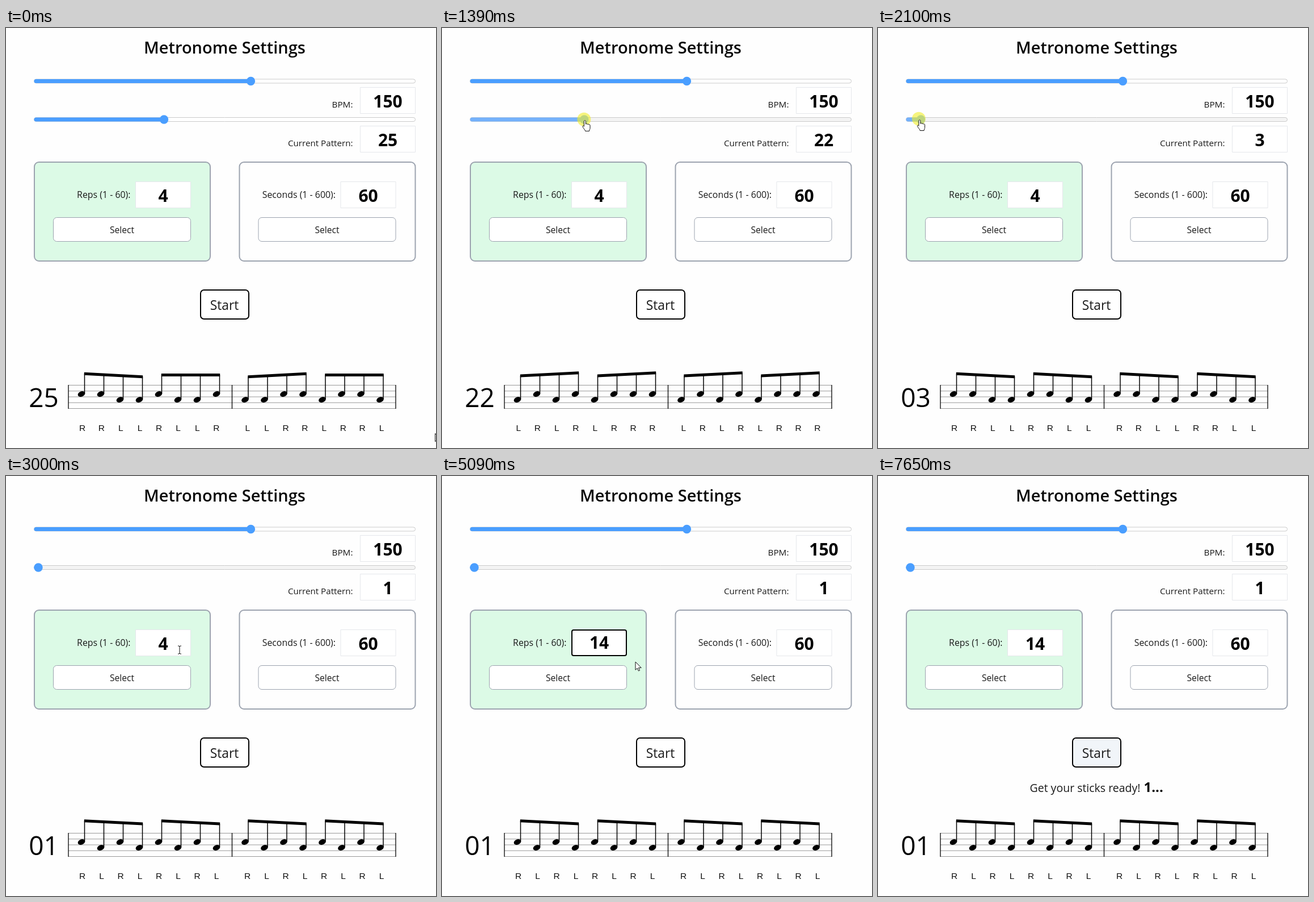
These frames come from a looping animation (758 by 739 pixels, 8000 ms). An HTML page with a canvas:

```html
<!DOCTYPE html>
<html lang="en">
<head>
<meta charset="utf-8">
<title>Metronome Settings</title>
<style>
  html, body { margin: 0; width: 100%; height: 100%; overflow: hidden; background: #fefefe; }
  canvas { display: block; }
</style>
</head>
<body>
<canvas id="stage" width="758" height="739"></canvas>
<script>
const ctx = document.getElementById('stage').getContext('2d');
const LOOP = 8000;
const UI = '"Open Sans", "Noto Sans", sans-serif';
const SANS = '"Liberation Sans", Arial, sans-serif';
const BLUE = '#4a9eff', GRAY = '#9ca3af', INK = '#1a1a1a';

// Sticking exercises; those in MIRRORED swap hands in the second bar.
const STICKING = ('RLRLRLRL LRLRLRLR RRLLRRLL LLRRLLRR RLRRLRLL RLLRLRRL RRLRLLRL ' +
  'RLRLLRLR RRRLRRRL LLLRLLLR RLLLRLLL LRRRLRRR RRRRLLLL RLRLRRLL LRLRLLRR RLRLRLRR ' +
  'RLRLRLLR RLRLRRLR RLRLRRRL LRLRLLLR RLRLRLLL LRLRLRRR RLRLRRRR RRLLRLRR RRLLRLLR').split(' ');
const MIRRORED = [16, 17, 18, 23, 24, 25];

// Pointer path: time, x, y
const PATH = [
  [350, 736, 342], [700, 500, 262], [1040, 276, 161], [1180, 276, 161],
  [1700, 173, 160], [1980, 96, 160], [2250, 45, 160], [2420, 8, 163],
  [2560, 40, 205], [2810, 262, 326], [2980, 306, 306], [3400, 306, 306],
  [3850, 286, 302], [4400, 286, 302], [4860, 341, 327], [5090, 341, 327],
  [5870, 398, 474], [5930, 398, 474], [6030, 545, 503], [6120, 733, 538]
];
const PRESS = [1000, 2420];
const TYPED = 4250, CLICK = 5870, READY = 5900;

const clamp = (v, a = 0, b = 1) => Math.min(b, Math.max(a, v));

function slope(i, k) {
  const p = PATH[i], a = PATH[i - 1], b = PATH[i + 1];
  if (!a || !b || (a[1] === p[1] && a[2] === p[2]) || (b[1] === p[1] && b[2] === p[2])) return 0;
  return (b[k] - a[k]) / (b[0] - a[0]);
}

function pointer(t) {
  if (t <= PATH[0][0]) return { x: PATH[0][1], y: PATH[0][2] };
  const i = PATH.findIndex(p => p[0] > t) - 1;
  if (i < 0) return { x: PATH.at(-1)[1], y: PATH.at(-1)[2] };
  const a = PATH[i], b = PATH[i + 1], d = b[0] - a[0], u = (t - a[0]) / d;
  const at = k => {
    const s = u * u * (3 - 2 * u);
    return a[k] + (b[k] - a[k]) * s +
      d * (u * (1 - u) * (1 - u) * slope(i, k) - u * u * (1 - u) * slope(i + 1, k));
  };
  return { x: at(1), y: at(2) };
}

function box(x, y, w, h, r, fill, stroke, line = 1) {
  const o = line / 2;
  ctx.beginPath();
  ctx.roundRect(x + o, y + o, w - line, h - line, r);
  ctx.fillStyle = fill;
  ctx.fill();
  if (!stroke) return;
  ctx.lineWidth = line;
  ctx.strokeStyle = stroke;
  ctx.stroke();
}

function text(s, x, y, size, align = 'left', weight = 400, color = INK, family = UI) {
  ctx.font = `${weight} ${size}px ${family}`;
  ctx.textAlign = align;
  ctx.fillStyle = color;
  ctx.fillText(s, x, y);
}

function segment(x1, y1, x2, y2, width, color) {
  ctx.beginPath();
  ctx.moveTo(x1, y1);
  ctx.lineTo(x2, y2);
  ctx.lineWidth = width;
  ctx.strokeStyle = color;
  ctx.stroke();
}

function disc(x, y, r, color) {
  ctx.beginPath();
  ctx.arc(x, y, r, 0, Math.PI * 2);
  ctx.fillStyle = color;
  ctx.fill();
}

function slider(y, x, fill, track) {
  box(49, y - 4, 673, 8, 4, track, '#cbcbcb');
  box(49, y - 4, x - 49, 8, 4, fill);
  disc(x, y, 7.7, fill);
}

function field(x, y, value, focus) {
  if (focus) box(x, y, 98, 47, 3, '#fff', '#000', 2);
  else box(x, y, 98, 47, 0, '#fff', '#e5e7eb');
  text(value, x + 49, y + (focus ? 34 : 36), 30, 'center', 700, '#000');
}

function panel(x, label, value, fill, focus) {
  box(x, 235, 312, 176, 8, fill, GRAY, 2);
  text(label, x + 170.5, 299, 15.9, 'right');
  field(x + 179, 270, value, focus);
  box(x + 34, 333, 243, 43, 6, '#fff', GRAY);
  text('Select', x + 155.5, 361, 15.7, 'center');
}

function beamed(hands, x) {
  const ys = hands.map(h => h === 'R' ? 644 : 654);
  const step = 34, first = x + 5.5, last = first + step * 3;
  const tilt = Math.sign(ys[3] - ys[0]) * 2.7;
  const same = ys.every(y => y === ys[0]);
  const mid = same ? ys[0] - 36 : hands[0] !== hands[1] && tilt ? 609.4 : tilt ? 611 : 610.4;
  const beamY = i => mid + tilt * (i * 2 / 3 - 1);
  ys.forEach((y, i) => {
    const nx = x + i * step;
    ctx.beginPath();
    ctx.ellipse(nx, y, 6.6, 4.7, -0.38, 0, Math.PI * 2);
    ctx.fillStyle = '#000';
    ctx.fill();
    segment(nx + 5.5, y - 1, nx + 5.5, beamY(i), 1.5, '#000');
  });
  ctx.beginPath();
  ctx.moveTo(first - 0.7, beamY(0) - 2.5);
  ctx.lineTo(last + 0.7, beamY(3) - 2.5);
  ctx.lineTo(last + 0.7, beamY(3) + 2.5);
  ctx.lineTo(first - 0.7, beamY(0) + 2.5);
  ctx.fill();
}

function score(n) {
  text(String(n).padStart(2, '0'), 66.5, 667, 46, 'center', 400, '#000');
  for (let i = 0; i < 5; i++) segment(110, 628.5 + i * 10.25, 687, 628.5 + i * 10.25, 1, '#999');
  for (const x of [110, 398.5, 687]) segment(x, 628, x, 670, 1.3, '#000');
  const bar = [...STICKING[n - 1]];
  const second = MIRRORED.includes(n) ? bar.map(h => h === 'R' ? 'L' : 'R') : bar;
  [bar, second].forEach((hands, b) => {
    beamed(hands.slice(0, 4), 133 + b * 288.5);
    beamed(hands.slice(4), 269 + b * 288.5);
    hands.forEach((h, i) => text(h, 134.7 + b * 291 + i * 33.75, 708.5, 15.5, 'center', 400, '#111', SANS));
  });
}

const ARROW = new Path2D('M0 0V14.2L3.3 11.2L5.4 16L7.6 15L5.5 10.4H10.2Z');
const HAND = new Path2D('M0 3.5c0-2 3-2 3 0v5c.3-1.2 2.6-1 2.8.4c.4-1 2.4-.8 2.6.6c.5-.8 2.3-.4 2.3 1v5' +
  'c0 2-1.5 3-1.5 5.2h-7c0-2-2.8-4.2-4.4-7.2c-1-2 .9-3 2.2-1z');
const IBEAM = new Path2D('M-3 -7H-1L0 -6L1 -7H3M0 -6V6M-3 7H-1L0 6L1 7H3');

function cursor(shape, x, y) {
  ctx.save();
  ctx.translate(x, y);
  ctx.lineWidth = 1;
  ctx.strokeStyle = '#111';
  ctx.fillStyle = '#fff';
  if (shape !== IBEAM) ctx.fill(shape);
  ctx.stroke(shape);
  ctx.restore();
}

function draw(t) {
  const p = pointer(t);
  const pressed = t >= PRESS[0] && t < PRESS[1];
  const visible = t < 30 || (t >= 350 && t < 6140);
  const onSlider = pressed || (t < 1180 && t > 350 && Math.abs(p.y - 161) < 8);
  const moved = t >= 1180;
  const raw = t < 1180 ? 25 : Math.round((p.x - 54.5) / 9.25) + 1;
  const n = t >= PRESS[1] ? 1 : clamp(raw, 1, 25);
  const focus = t >= 3150 && t < CLICK;

  ctx.fillStyle = '#fefefe';
  ctx.fillRect(0, 0, 758, 739);
  text('Metronome Settings', 385.5, 45, 29, 'center', 600, '#0a0a0a');

  slider(93.5, 431.5, BLUE, '#fff');
  text('BPM:', 611.5, 140, 15.3, 'right');
  field(624, 104, '150');

  const fill = !onSlider ? BLUE : moved ? '#74b1fb' : '#4a8fd9';
  const track = t < 350 || (!onSlider && !moved) ? '#fff' : onSlider && !moved ? '#ebebeb' : '#f4f4f4';
  slider(161, 57 + (n - 1) * 9.23, fill, track);
  text('Current Pattern:', 611.5, 207.5, 15.2, 'right');
  field(624, 172, String(n));

  panel(49, 'Reps (1 - 60):', t < TYPED ? '4' : '14', '#dcfae6', focus);
  panel(410.5, 'Seconds (1 - 600):', '60', '#fefefe');

  const onStart = p.x > 342 && p.x < 428 && p.y > 461 && p.y < 513;
  const startFill = t >= 5990 ? '#f1f5f9' : onStart ? '#e2e8f0' : '#fff';
  box(342, 460, 87, 53, 6, startFill, '#000', 2);
  text('Start', 385, 496, 22.8, 'center');

  if (t >= READY) {
    ctx.globalAlpha = clamp((t - 5870) / 95);
    text('Get your sticks ready!', 267.5, 556, 19.5);
    text((t < 6660 ? 3 : t < 7650 ? 2 : 1) + '...', 468.5, 556, 24, 'left', 700, '#000');
    ctx.globalAlpha = 1;
  }

  score(n);

  if (!visible) return;
  if (t < 30) return cursor(ARROW, 756.5, 713.5);
  if (pressed) disc(p.x, p.y, 12, 'rgba(240, 236, 40, .6)');
  const inField = p.y > 270 && p.y < 317 && ((p.x > 228 && p.x < 326) || (p.x > 589 && p.x < 688));
  cursor(onSlider ? HAND : inField ? IBEAM : ARROW, p.x, p.y);
}

function tick() {
  draw(performance.now() % LOOP);
  requestAnimationFrame(tick);
}
tick();
</script>
</body>
</html>
```
